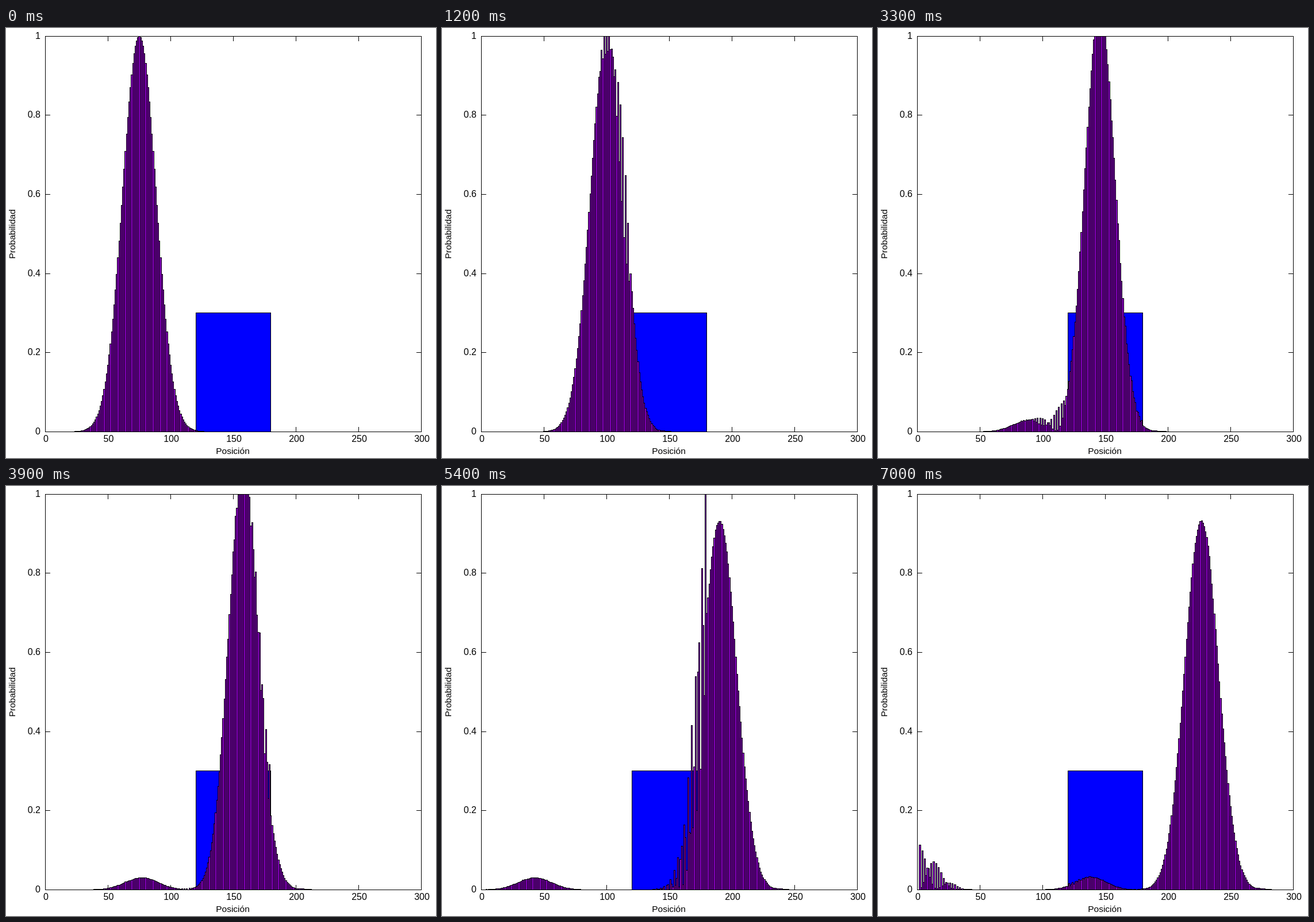
An HTML page with a canvas for the animation above (7100 ms loop, 748 by 748 pixels).

```html
<!DOCTYPE html>
<html lang="es">
<head>
<meta charset="utf-8">
<title>Paquete de ondas</title>
<style>
html, body { margin: 0; width: 100%; height: 100%; overflow: hidden; background: #fff; }
canvas { display: block; }
</style>
</head>
<body>
<canvas id="plot" width="748" height="748"></canvas>
<script>
const ctx = document.getElementById('plot').getContext('2d');
const N = 300, FIRST = 1, CYCLES = 70, LAMBDA = 0.3;
const FRAMES = 71, FRAME_MS = 100, STEPS = 10;
const LEFT = 68, RIGHT = 722, TOP = 14, BOTTOM = 702;
const FONT = 'px "Liberation Sans", Arial, sans-serif';

const px = x => Math.floor(68.62 + 2.179 * x);
const py = y => Math.floor(702.38 - 688 * y);

// Crank-Nicolson solver for a Gaussian packet meeting a square barrier.
function makeWave() {
  const k = 2 * Math.PI * CYCLES / N;
  const s = 1 / (4 * k * k);
  const make = () => new Float64Array(N + 1);
  const re = make(), im = make();
  const aRe = make(), aIm = make(), bRe = make(), bIm = make();
  const gRe = make(), gIm = make();

  for (let j = FIRST + 1; j < N; j++) {
    const env = Math.exp(-8 * (4 * j - N) ** 2 / N ** 2);
    re[j] = env * Math.cos(k * j);
    im[j] = env * Math.sin(k * j);
  }
  for (let j = N - 1; j > FIRST; j--) {
    const v = j >= 2 * N / 5 && j <= 3 * N / 5 ? LAMBDA * k * k : 0;
    const dRe = -2 - v + aRe[j], dIm = 2 / s + aIm[j];
    const d = dRe * dRe + dIm * dIm;
    gRe[j] = dRe / d;
    gIm[j] = -dIm / d;
    aRe[j - 1] = -gRe[j];
    aIm[j - 1] = -gIm[j];
  }

  function step() {
    for (let j = N - 1; j > FIRST; j--) {
      const r = -4 * im[j] / s - bRe[j];
      const i = 4 * re[j] / s - bIm[j];
      bRe[j - 1] = gRe[j] * r - gIm[j] * i;
      bIm[j - 1] = gRe[j] * i + gIm[j] * r;
    }
    let cRe = 0, cIm = 0;
    for (let j = FIRST; j < N - 1; j++) {
      const r = aRe[j] * cRe - aIm[j] * cIm + bRe[j];
      cIm = aRe[j] * cIm + aIm[j] * cRe + bIm[j];
      cRe = r;
      re[j + 1] = cRe - re[j + 1];
      im[j + 1] = cIm - im[j + 1];
    }
  }
  const density = () => re.map((r, j) => r * r + im[j] * im[j]);
  return { step, density };
}

// The initial state, then the first step, then every tenth one.
function simulate() {
  const wave = makeWave();
  const states = [wave.density()];
  while (states.length < FRAMES) {
    const count = states.length === 1 ? 1 : STEPS;
    for (let n = 0; n < count; n++) wave.step();
    states.push(wave.density());
  }
  return states;
}

function label(text, x, y, align, size = 16) {
  ctx.font = size + FONT;
  ctx.textAlign = align;
  ctx.fillText(text, x, y);
}

function drawAxes() {
  ctx.fillStyle = '#fff';
  ctx.fillRect(0, 0, 748, 748);
  ctx.fillStyle = '#000';
  for (let x = 0; x <= 300; x += 50) {
    const p = px(x);
    ctx.fillRect(p, TOP, 1, 9);
    ctx.fillRect(p, BOTTOM - 8, 1, 9);
    label(x, p + 1.5, 720, 'center');
  }
  for (let i = 0; i <= 5; i++) {
    const p = py(i / 5);
    ctx.fillRect(LEFT, p, 9, 1);
    ctx.fillRect(RIGHT - 8, p, 9, 1);
    label(i / 5, 60, p + 5, 'right');
  }
  label('Posición', 394.5, 741, 'center', 15.5);
  ctx.save();
  ctx.translate(16, 358.5);
  ctx.rotate(-Math.PI / 2);
  label('Probabilidad', 0, 0, 'center', 15.5);
  ctx.restore();
}

// A filled box with a one-pixel black outline, clipped at the top of the plot.
function drawBox(from, to, value, color) {
  const x = px(from), w = px(to) - x;
  const y = Math.max(TOP, py(value)), h = BOTTOM - y;
  if (h <= 0) return;
  ctx.fillStyle = '#000';
  ctx.fillRect(x, y, w + 1, h);
  ctx.fillStyle = color;
  ctx.fillRect(x + 1, y + 1, w - 1, h - 1);
}

function drawBorder() {
  ctx.strokeStyle = '#000';
  ctx.lineWidth = 1;
  ctx.strokeRect(LEFT + 0.5, TOP + 0.5, RIGHT - LEFT, BOTTOM - TOP);
}

const states = simulate();
let shown = -1;

function render(now) {
  const index = Math.floor((now - start) / FRAME_MS) % FRAMES;
  if (index !== shown) {
    shown = index;
    drawAxes();
    drawBox(120, 180, LAMBDA, '#00f');
    states[index].forEach((value, j) => drawBox(j - 0.5, j + 0.5, value, '#9400d3'));
    drawBorder();
  }
  requestAnimationFrame(() => render(performance.now()));
}

const start = performance.now();
render(start);
</script>
</body>
</html>
```
